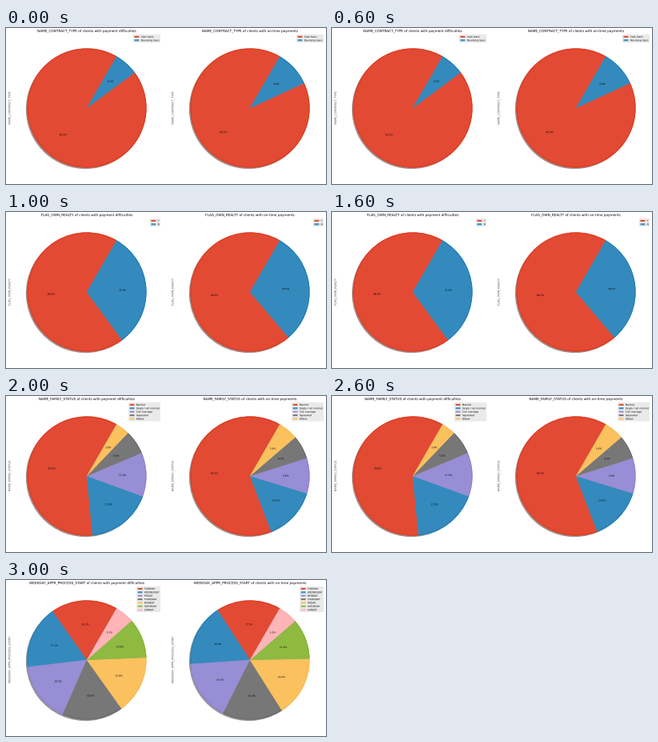
A matplotlib script for the animation above (4 s loop, 400 by 195 pixels).

```python
import matplotlib.pyplot as plt
import numpy as np
from matplotlib.animation import FuncAnimation
from matplotlib.colors import to_rgb
from matplotlib.patches import PathPatch, Rectangle, Wedge
from matplotlib.textpath import TextPath
from matplotlib.transforms import Affine2D

WIDTH, HEIGHT, DPI = 400, 195, 100
RADIUS, START_ANGLE, SHADOW = 74.5, 60, 1.6
HALF = 1.25 * RADIUS
CENTRES = (101, 305)
CENTRE_Y = HEIGHT - 100
TITLE_SIZE, LABEL_SIZE, EM = 4.2, 3.5, 2.92
COLORS = ["#E24A33", "#348ABD", "#988ED5", "#777777",
          "#FBC15E", "#8EBA42", "#FFB5B8"]
GROUPS = ("payment difficulties", "on-time payments")

LOANS = ["Cash loans", "Revolving loans"]
FAMILY = ["Married", "Single / not married", "Civil marriage",
          "Separated", "Widow"]
DAYS = ["TUESDAY", "WEDNESDAY", "FRIDAY", "THURSDAY", "MONDAY",
        "SATURDAY", "SUNDAY"]
DAYS_ON_TIME = ["TUESDAY", "WEDNESDAY", "MONDAY", "THURSDAY", "FRIDAY",
                "SATURDAY", "SUNDAY"]

# column name, then (labels, percentages) for each client group
SCENES = [
    ("NAME_CONTRACT_TYPE",
     (LOANS, [93.5, 6.5]),
     (LOANS, [90.2, 9.8])),
    ("FLAG_OWN_REALTY",
     (["Y", "N"], [68.4, 31.6]),
     (["Y", "N"], [69.5, 30.5])),
    ("NAME_FAMILY_STATUS",
     (FAMILY, [59.8, 17.9, 11.9, 6.5, 3.8]),
     (FAMILY, [64.2, 14.5, 9.6, 6.4, 5.4])),
    ("WEEKDAY_APPR_PROCESS_START",
     (DAYS, [18.1, 17.1, 16.5, 16.5, 15.8, 10.8, 5.2]),
     (DAYS_ON_TIME, [17.5, 16.9, 16.5, 16.4, 16.4, 11.0, 5.3])),
]

plt.rcParams["font.family"] = "DejaVu Sans"
fig = plt.figure(figsize=(WIDTH / DPI, HEIGHT / DPI), dpi=DPI, facecolor="white")
ax = fig.add_axes([0, 0, 1, 1])
ax.set(xlim=(0, WIDTH), ylim=(0, HEIGHT))
ax.axis("off")


def add(patch):
    patch.set_snap(False)
    ax.add_patch(patch)


def text_width(text, size):
    return TextPath((0, 0), text, size=size).get_extents().x1


def put_text(text, x, y, size, color="black", align="center",
             middle=False, angle=0):
    """Draw text as outlines so that it keeps sub-pixel positions."""
    path = TextPath((0, 0), text, size=size)
    box = path.get_extents()
    dx = -(box.x0 + box.x1) / 2 if align == "center" else 0
    dy = -(box.y0 + box.y1) / 2 if middle else 0
    place = Affine2D().translate(dx, dy).rotate_deg(angle).translate(x, y)
    add(PathPatch(place.transform_path(path), fc=color, lw=0, zorder=5))


def draw_pie(cx, values):
    edges = START_ANGLE + 360 * np.cumsum([0, *values]) / sum(values)
    for value, a, b, color in zip(values, edges, edges[1:], COLORS):
        rgb = np.array(to_rgb(color))
        add(Wedge((cx - SHADOW, CENTRE_Y - SHADOW), RADIUS, a, b,
                  fc=0.3 * rgb, alpha=0.5, lw=0, zorder=1))
        add(Wedge((cx, CENTRE_Y), RADIUS, a, b, fc=color, ec=color,
                  lw=0.15, zorder=2))
        rim = np.clip(rgb - 0.08 * (1 - rgb), 0, 1)
        add(Wedge((cx, CENTRE_Y), RADIUS, a, b, width=1.2, fc=rim,
                  lw=0, zorder=3))
        mid = np.radians((a + b) / 2)
        put_text(f"{value:.1f}%", cx + 0.6 * RADIUS * np.cos(mid),
                 CENTRE_Y + 0.6 * RADIUS * np.sin(mid), EM, middle=True)


def draw_legend(cx, labels):
    right, top = cx + HALF - EM / 2, CENTRE_Y + HALF - EM / 2
    row = 1.5 * EM
    width = max(text_width(label, EM) for label in labels) + 3.6 * EM
    height = len(labels) * row + 0.3 * EM
    left = right - width
    add(Rectangle((left, top - height), width, height, fc="#EAEAEA",
                  ec="#CCCCCC", lw=0.15, zorder=3))
    for i, (label, color) in enumerate(zip(labels, COLORS)):
        base = top - 1.25 * EM - i * row
        add(Rectangle((left + 0.4 * EM, base), 2 * EM, 0.7 * EM,
                      fc=color, lw=0, zorder=4))
        put_text(label, left + 3.2 * EM, base, EM, align="left")


def draw(index):
    for patch in list(ax.patches):
        patch.remove()
    column, *charts = SCENES[index]
    for cx, group, (labels, values) in zip(CENTRES, GROUPS, charts):
        put_text(f"{column} of clients with {group}", cx,
                 CENTRE_Y + HALF + 1.75, TITLE_SIZE)
        put_text(column, cx - HALF - 2.4, CENTRE_Y, LABEL_SIZE,
                 color="#555555", angle=90)
        draw_pie(cx, values)
        draw_legend(cx, labels)
    return ax.patches


anim = FuncAnimation(fig, draw, frames=len(SCENES), interval=1000,
                     init_func=lambda: [], repeat=True, repeat_delay=0)
plt.show()
```
